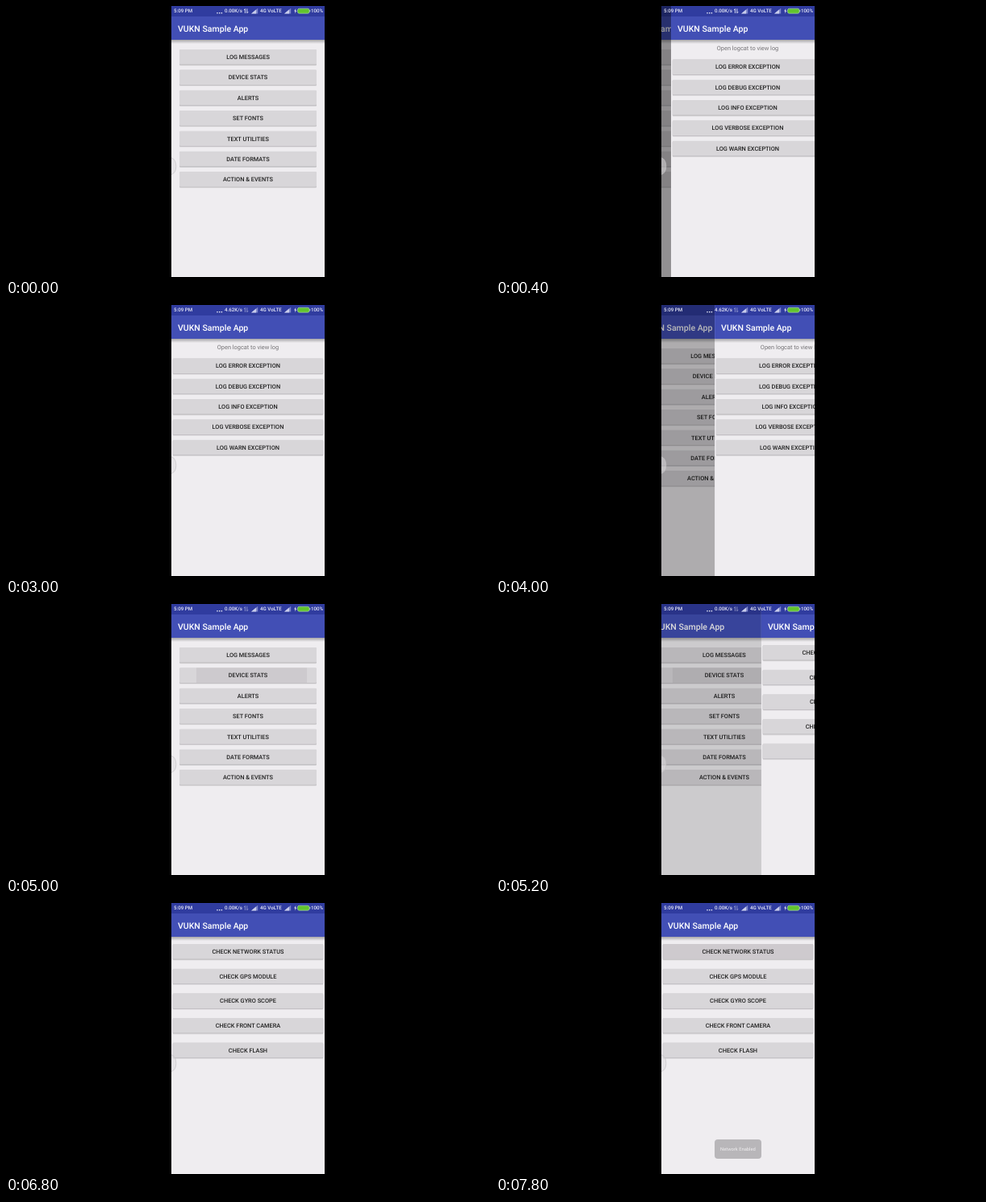
Recreate the animation shown at these times as an HTML page. Size 600 by 337 pixels, loop 8000 ms.

```html
<!DOCTYPE html>
<html lang="en">
<head>
<meta charset="utf-8">
<title>Sample app walkthrough</title>
<style>
  html, body { margin: 0; height: 100%; overflow: hidden; background: #000; }
  svg { display: block; width: 100vw; height: 100vh; }
  text { font-family: Roboto, sans-serif; font-weight: 500; text-rendering: geometricPrecision; white-space: pre; }
  .title { font-size: 10.56px; fill: #fff; }
  .label { font-size: 7.39px; fill: #212121; text-anchor: middle; }
  .hint { font-size: 7.39px; font-weight: 400; fill: #757376; text-anchor: middle; }
  .status text { font-size: 6.2px; fill: #e6e8f6; }
  .toast { font-size: 5.8px; font-weight: 400; fill: #f0eef0; text-anchor: middle; }
</style>
</head>
<body>
<svg id="stage" viewBox="0 0 600 337"></svg>
<script>
const LOOP = 8000, STEP = 200;
const LEFT = 205, WIDTH = 190;
const SLIDE_MS = 400, PARALLAX = 49, DIM = 0.42;

const rect = (x, y, w, h, fill, extra = '') =>
  `<rect x="${x}" y="${y}" width="${w}" height="${h}" fill="${fill}" ${extra}/>`;
const text = (x, y, content, cls = '') => `<text x="${x}" y="${y}" class="${cls}">${content}</text>`;

const button = (label, x, w, cy, press = '') =>
  rect(x, cy - 8.2, w, 18.9, '#000', 'rx="1.2" opacity=".1"') +
  rect(x, cy - 9, w, 18.9, '#bdbbbe', 'rx="1.2"') +
  rect(x, cy - 9.5, w, 18.6, '#d8d6d9', 'rx="1.2"') + press +
  text(300, cy + 2.6, label, 'label');

function page(id, labels, { x, firstY, pitch, extra = '', press = {} }) {
  const buttons = labels.map((label, i) =>
    button(label, x, 600 - 2 * x, firstY + i * pitch, press[i])).join('');
  return `<g id="${id}">
    ${rect(LEFT, 0, WIDTH, 337, '#efedf0')}
    ${rect(LEFT, 42, WIDTH, 5, 'url(#shade)')}
    ${rect(LEFT, 0, WIDTH, 13, '#303c9f')}
    ${rect(LEFT, 13, WIDTH, 29, '#424fb5')}
    ${text(213, 31.8, 'VUKN Sample App', 'title')}
    ${extra}${buttons}</g>`;
}

const signal = x =>
  `<path d="M${x} 9.4h8.2V2.8z" fill="#7f88cb"/><path d="M${x} 9.4h6V4.6z" fill="#c9cdec"/>`;

const statusBar = `<g class="status">
  ${text(208, 8.4, '5:09 PM')}
  ${[262, 264.7, 267.4].map(x => rect(x - .7, 8, 1.4, 1.4, '#e6e8f6')).join('')}
  <text id="speed" x="271" y="8.4"></text>
  <path id="arrows" d="M296.4 9V3.6l-1.4 1.6M298.8 3.4v5.4l1.4-1.6" fill="none" stroke="#e6e8f6" stroke-width=".9"/>
  ${signal(304)}${text(315, 8.4, '4G VoLTE')}${signal(345)}
  <path d="M359.4 3l-2.2 3.5h1.5l-.8 3 2.5-3.8h-1.5z" fill="#e6e8f6"/>
  ${rect(361.5, 3.2, 14.5, 6, '#62c52d', 'rx="2" stroke="#b5d9b8" stroke-width=".6"')}
  ${rect(376.3, 5, 1, 2.4, '#b5d9b8')}
  ${text(378, 8.4, '100%')}</g>`;

stage.innerHTML = `
  <defs>
    <clipPath id="screen">${rect(LEFT, 0, WIDTH, 337, '#000')}</clipPath>
    <linearGradient id="shade" x2="0" y2="1">
      <stop stop-opacity=".3"/><stop offset="1" stop-opacity="0"/>
    </linearGradient>
  </defs>
  ${rect(0, 0, 600, 337, '#000')}
  <g clip-path="url(#screen)">
    ${page('home', ['LOG MESSAGES', 'DEVICE STATS', 'ALERTS', 'SET FONTS', 'TEXT UTILITIES', 'DATE FORMATS', 'ACTION &amp; EVENTS'],
      { x: 215, firstY: 63.5, pitch: 25.35, press: { 1: rect(236, 79.4, 137, 18.6, '#cdcace', 'id="ripple"') } })}
    ${rect(LEFT, 0, WIDTH, 337, '#000', 'id="dim"')}
    ${page('logs', ['LOG ERROR EXCEPTION', 'LOG DEBUG EXCEPTION', 'LOG INFO EXCEPTION', 'LOG VERBOSE EXCEPTION', 'LOG WARN EXCEPTION'],
      { x: 206.8, firstY: 75.8, pitch: 25.35, extra: text(300, 55.4, 'Open logcat to view log', 'hint') })}
    ${page('stats', ['CHECK NETWORK STATUS', 'CHECK GPS MODULE', 'CHECK GYRO SCOPE', 'CHECK FRONT CAMERA', 'CHECK FLASH'],
      { x: 206.8, firstY: 60.5, pitch: 30.65, press: { 0: rect(206.8, 51, 186.4, 18.6, '#cecace', 'id="pressed" rx="1.2"') } })}
    ${statusBar}
    <path d="M205 188.8q5.8 2 5.8 10.4t-5.8 10.4" fill="#dddbde" fill-opacity=".5" stroke="#c4c2c5" stroke-opacity=".75" stroke-width=".9"/>
    <g id="toast">${rect(271, 294, 58, 24, '#b8b6b9', 'rx="4"')}${text(300, 308.2, 'Network Enabled', 'toast')}</g>
  </g>`;

const el = id => document.getElementById(id);
const show = (id, on) => el(id).setAttribute('visibility', on ? 'visible' : 'hidden');
const shift = (id, x) => el(id).setAttribute('transform', `translate(${x})`);

// Eased progress of a page slide that begins at the given time.
function slide(t, start) {
  const p = Math.min(1, Math.max(0, (t - start) / SLIDE_MS));
  return 1 - (1 - p) ** 2.63;
}

function draw(now) {
  const t = Math.floor((now % LOOP) / STEP) * STEP;
  const logsCover = slide(t, 140) - slide(t, 3940);
  const statsCover = slide(t, 5140);
  const cover = Math.max(logsCover, statsCover);

  shift('logs', WIDTH * (1 - logsCover));
  shift('stats', WIDTH * (1 - statsCover));
  shift('home', -PARALLAX * cover);
  el('dim').setAttribute('opacity', DIM * cover);

  el('speed').textContent = t >= 1000 && t < 5000 ? '4.62K/s' : '0.00K/s';
  el('arrows').setAttribute('opacity', t < 2200 ? 1 : 0.5);
  show('ripple', t >= 5000);
  show('pressed', t >= 7800);
  show('toast', t >= 7800);
  requestAnimationFrame(frame);
}

const started = performance.now();
const frame = () => draw(performance.now() - started);
frame();
</script>
</body>
</html>
```
